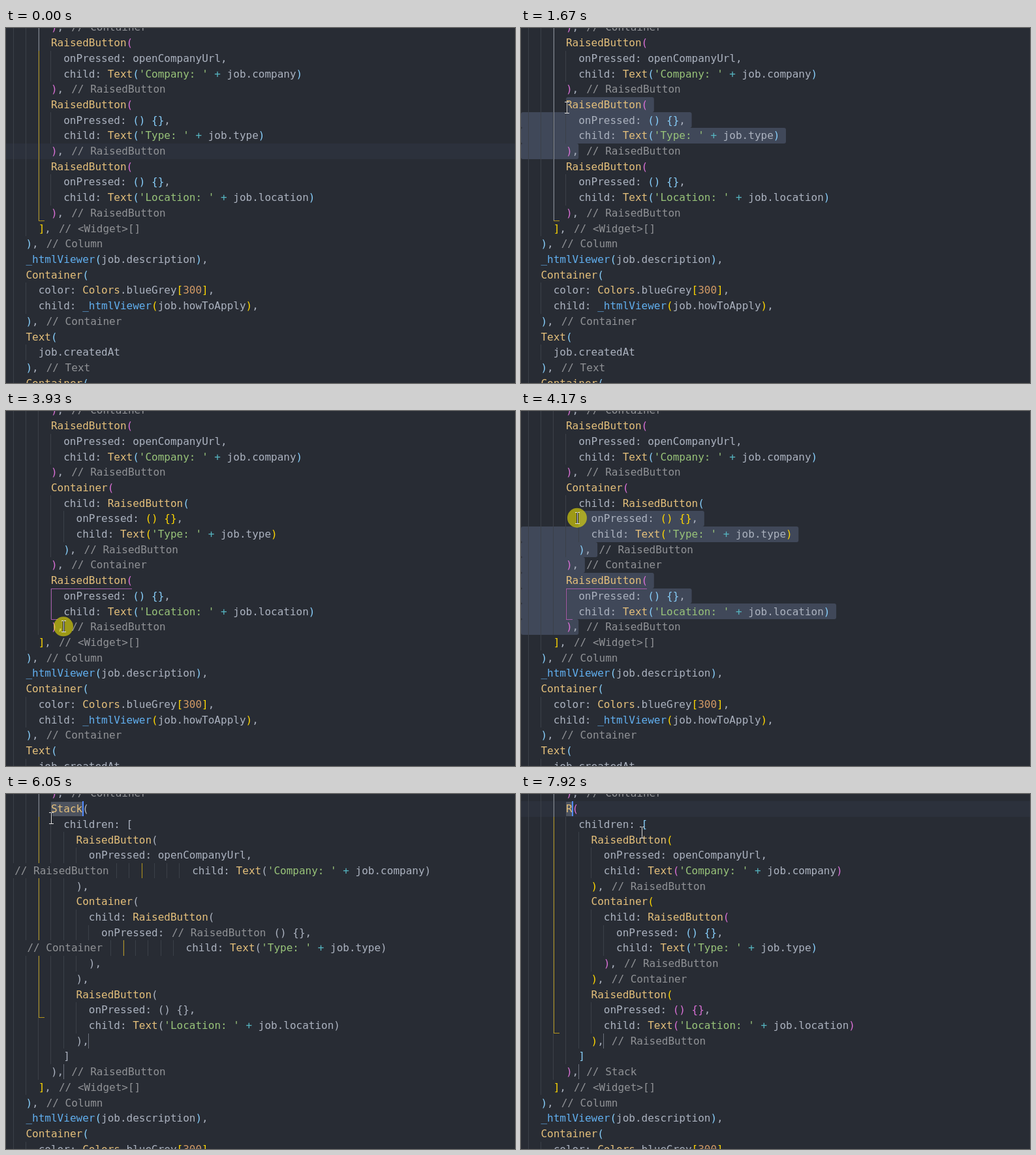
An HTML page with a canvas for the animation above (7990 ms loop, 780 by 544 pixels).

```html
<!DOCTYPE html>
<html lang="en">
<head>
<meta charset="utf-8">
<title>Editor</title>
<style>
html, body { margin: 0; width: 100%; height: 100%; overflow: hidden; background: #282c34; }
canvas { display: block; }
</style>
</head>
<body>
<canvas id="stage" width="780" height="544"></canvas>
<script>
const ctx = document.getElementById('stage').getContext('2d', { alpha: false });
const LOOP = 7990, LEFT = 11.2, CHAR = 9.63, TOP = 10.9, LINE = 23.71, GAP = 12;
const BRACKETS = ['#ffd700', '#da70d6', '#87cefa'];
const GOLD = '#b3941c', GREY = '#858a93', ORCHID = '#a45aa8';

const colX = col => LEFT + col * CHAR;
const rowY = row => TOP + row * LINE;
const indent = (n, lines) => lines.map(line => ' '.repeat(n) + line);

// Document states
const button = (action, title, field) => [
  'RaisedButton(',
  `  onPressed: ${action},`,
  `  child: Text('${title}: ' + job.${field})`,
  '), // RaisedButton'
];
const company = button('openCompanyUrl', 'Company', 'company');
const type = button('() {}', 'Type', 'type');
const place = button('() {}', 'Location', 'location');
const boxedType = ['Container(', '  child: ' + type[0], ...indent(2, type.slice(1)), '), // Container'];
const stack = name => [
  name + '(', '  children: [',
  ...indent(4, [...company, ...boxedType, ...place]),
  '  ]', '), // Stack'
];
const page = body => [
  '      ), // Container',
  ...indent(6, body),
  '    ], // <Widget>[]',
  '  ), // Column',
  '  _htmlViewer(job.description),',
  '  Container(',
  '    color: Colors.blueGrey[300],',
  '    child: _htmlViewer(job.howToApply),',
  '  ), // Container',
  '  Text(',
  '    job.createdAt',
  '  ), // Text',
  '  Container('
].map(line => {
  const [code, label] = line.split(' // ');
  return { code, label: label && '// ' + label, labelCol: code.length };
});

const plain = page([...company, ...type, ...place]);
const wrapped = page([...company, ...boxedType, ...place]);
const stacked = page(stack('Stack'));
const renamed = page(stack('R'));

// Closing labels drift to wrong columns until the editor refreshes them
const drifted = stacked.map((line, i) => {
  const row = i - 1;
  if (row < 0 || row > 17) return line;
  const labels = {
    4: ['// RaisedButton', 0], 8: ['// RaisedButton', 25],
    9: ['// Container', 2], 17: ['// RaisedButton', line.code.length]
  };
  const [label, labelCol] = labels[row] || [];
  return { code: line.code, label, labelCol };
});

// Extra space that a label inside a line puts before the given column
const inlineShift = ({ code, label, labelCol }, col) =>
  label && labelCol < code.length && col >= labelCol ? label.length * CHAR + GAP + 2 : 0;

// Pointer path: time, x, y
const path = [
  [70, 450, 452], [300, 300, 330], [500, 140, 205], [650, 46, 161], [810, 88, 188],
  [900, 88, 188], [1210, 70, 122], [1900, 70, 122], [2250, 98, 400], [2600, 104, 351],
  [2750, 104, 351], [2910, 88, 331], [3930, 88, 331], [4170, 86, 164], [4720, 66, 23],
  [5400, 66, 23], [5580, 69, 37], [6510, 69, 37], [6900, 105, 68], [7280, 180, 79],
  [7370, 188, 77], [7520, 185, 59], [LOOP, 185, 59]
];
function pointer(t) {
  const i = Math.max(1, path.findIndex(p => p[0] >= t));
  const [t0, x0, y0] = path[i - 1], [t1, x1, y1] = path[i];
  const k = Math.max(0, (t - t0) / (t1 - t0));
  return [x0 + (x1 - x0) * k, y0 + (y1 - y0) * k];
}

function rect(x, y, w, h, color) {
  ctx.fillStyle = color;
  ctx.fillRect(x, y, w, h);
}

function roundBox(x, y, w, h, color) {
  ctx.fillStyle = color;
  ctx.beginPath();
  ctx.roundRect(x, y, w, h, 3);
  ctx.fill();
}

function selection(doc, endRow, endCol, [x, y]) {
  const startRow = Math.floor((y - TOP) / LINE);
  const length = row => doc[row + 1].code.length;
  const startCol = Math.min(length(startRow), Math.round((x - LEFT) / CHAR));
  for (let row = startRow; row <= endRow; row++) {
    const from = row === startRow ? colX(startCol) : 0;
    const to = colX(row === endRow ? endCol : length(row) + 1);
    const y0 = Math.round(rowY(row)), y1 = Math.round(rowY(row + 1));
    if (to > from) roundBox(from, y0, to - from, y1 - y0, '#404859');
  }
}

function guides(doc) {
  doc.forEach((line, i) => {
    const y0 = Math.round(rowY(i - 1)), h = Math.round(rowY(i)) - y0;
    const depth = line.code.search(/\S/);
    for (let col = 0; col < depth; col += 2) {
      rect(Math.floor(colX(col) + inlineShift(line, col)), y0, 1, h, '#3b4048');
    }
  });
}

function listScope(doc, endRow, golden) {
  for (let row = -1; row < endRow; row++) {
    const x = 50 + Math.round(inlineShift(doc[row + 1], 4));
    const y0 = Math.round(rowY(row)), h = Math.round(rowY(row + 1)) - y0;
    rect(x, y0, 1, h, golden && row > 0 ? GOLD : GREY);
  }
  rect(50, Math.floor(rowY(endRow)), 9, 1, GOLD);
}

function callScope(row) {
  const top = Math.round(rowY(row + 1)), bottom = Math.round(rowY(row + 3));
  rect(69, top, 124, 1, ORCHID);
  rect(69, top, 1, bottom - top, ORCHID);
  rect(69, bottom, 10, 1, ORCHID);
}

function tokenColor(token) {
  if (token[0] === "'") return '#98c379';
  if (token === '+') return '#56b6c2';
  if (/^\d/.test(token)) return '#d19a66';
  if (/^[A-Z]/.test(token)) return '#e5c07b';
  if (token[0] === '_') return '#61afef';
  return '#abb2bf';
}

function drawText(doc, uncolored) {
  let depth = 2;
  doc.forEach((line, i) => {
    const { code, label, labelCol } = line;
    const base = Math.round(rowY(i - 1) + 17.2);
    for (const { 0: token, index } of code.matchAll(/'[^']*'|\w+|\S/g)) {
      let color = tokenColor(token);
      if ('([{)]}'.includes(token)) {
        const opens = '([{'.includes(token);
        if (!opens) depth--;
        if (!uncolored || i < 1 || i > 18) color = BRACKETS[(depth + 3) % 3];
        if (opens) depth++;
      }
      ctx.fillStyle = color;
      ctx.fillText(token, colX(index) + inlineShift(line, index), base);
    }
    if (label) {
      ctx.fillStyle = '#909296';
      ctx.fillText(label, colX(labelCol) + (labelCol < code.length ? 2 : GAP), base);
    }
  });
}

function caret(row, col, color = '#528bff', width = 2) {
  rect(Math.floor(colX(col)), Math.round(rowY(row)), width, 23, color);
}

function wordMark(row, col, length) {
  rect(colX(col), Math.round(rowY(row)) + 1, length * CHAR, 22, '#4d535f');
}

function drawPointer([x, y], pressed) {
  if (pressed) {
    ctx.fillStyle = 'rgba(255, 245, 0, .55)';
    ctx.beginPath();
    ctx.arc(x, y, 15, 0, 7);
    ctx.fill();
  }
  x = Math.round(x);
  y = Math.round(y);
  rect(x - 1, y - 8, 3, 17, '#1d2027');
  rect(x, y - 8, 1, 17, '#e2e2e2');
  for (const end of [y - 9, y + 8]) {
    rect(x - 3, end, 3, 1, '#e2e2e2');
    rect(x + 1, end, 3, 1, '#e2e2e2');
  }
}

function draw(t) {
  const during = (from, to) => t >= from && t < to;
  const doc = t < 1820 ? plain : t < 5900 ? wrapped : t < 6510 ? drifted : t < 7840 ? stacked : renamed;
  rect(0, 0, 780, 544, '#282c34');

  const activeRow = t < 900 ? 7 : during(2910, 3930) ? 13 : t >= 7840 ? 0 : -1;
  if (activeRow >= 0) rect(0, Math.round(rowY(activeRow)), 780, 24, '#2c313c');

  if (during(900, 1820)) selection(doc, 7, 8, pointer(Math.min(t, 1210)));
  if (during(3930, 5900)) selection(doc, 13, 8, pointer(Math.min(t, 4720)));
  if (during(1820, 2840)) {
    wordMark(4, 6, 9);
    ctx.strokeStyle = '#c9cdd4';
    ctx.strokeRect(30.5, Math.round(rowY(17)) + .5, 87, 23);
  }
  if (during(5900, 7840)) wordMark(0, 6, 5);
  if (t >= 7840) wordMark(0, 6, 1);

  guides(doc);
  if (during(900, 1440)) callScope(4);
  else if (during(2840, 4790)) callScope(10);
  else if (t < 1820) listScope(doc, 12, t < 900);
  else if (t < 2840) listScope(doc, 13, true);
  else if (t < 5900) listScope(doc, 14, false);
  else listScope(doc, t < 6510 ? 14 : t < 7840 ? 18 : 15, true);

  drawText(doc, during(5900, 6280));

  // Snippet stops
  const stops = during(1820, 2840) ? [[5, 15], [9, 8]] : t >= 5900 ? [[15, 12], [17, 8]] : [];
  for (const [row, col] of stops) caret(row, col, '#6b717c', 1);

  if (during(1210, 1670)) caret(4, 6);
  if (during(2910, 3470)) caret(13, 8);
  if (during(4720, 5110)) caret(0, 6);
  if (during(5900, 7840) && Math.floor((t - 5900) / 530) % 2 === 0) caret(0, 11);
  if (t >= 7840) caret(0, 7);

  const pressed = during(900, 1440) || during(2840, 2990) || during(3930, 4960);
  if (t >= 70) drawPointer(pointer(t), pressed);
}

ctx.font = '16px "DejaVu Sans Mono", monospace';
const start = performance.now();
function tick() {
  draw((performance.now() - start) % LOOP);
  requestAnimationFrame(tick);
}
tick();
</script>
</body>
</html>
```
